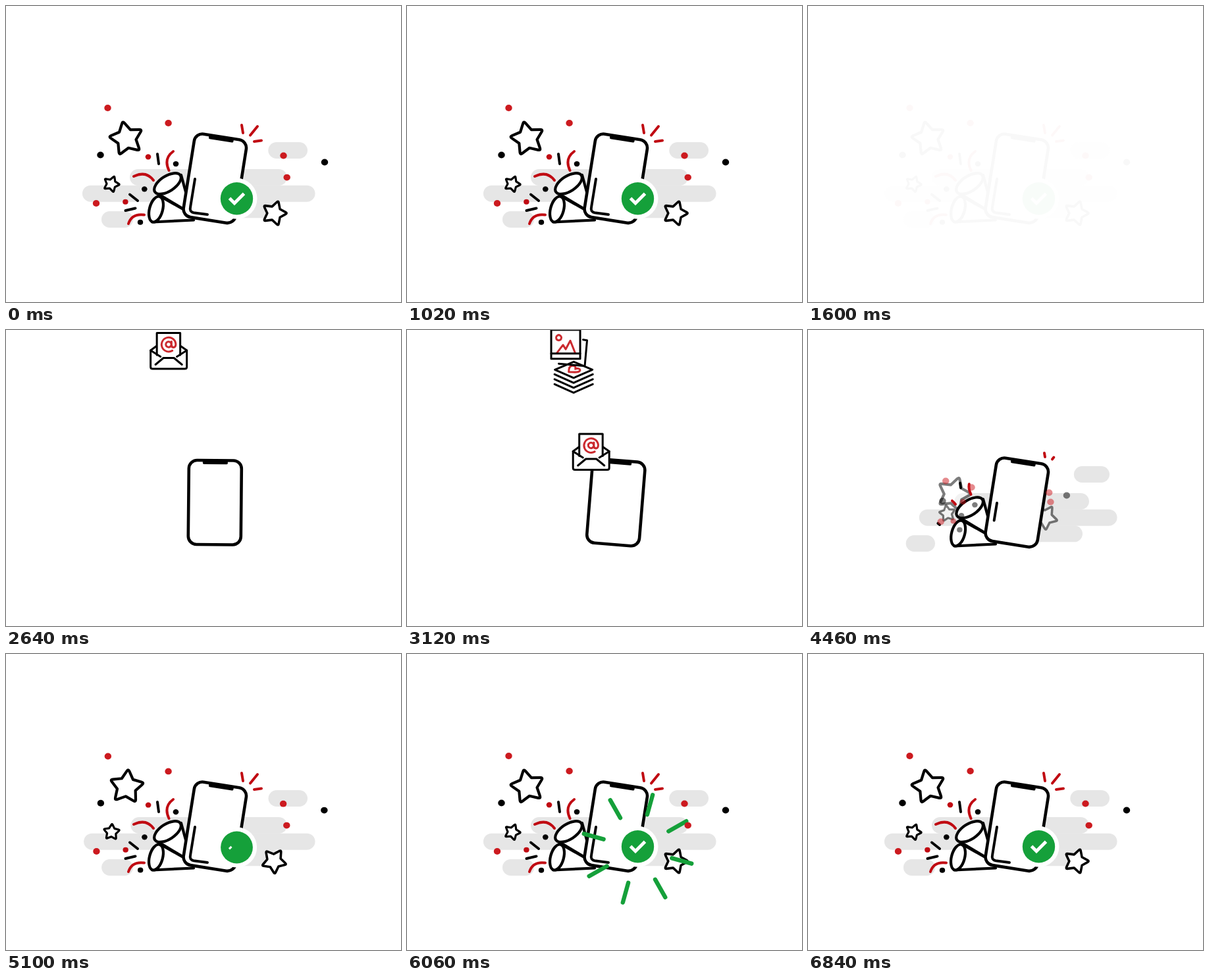
These frames come from a looping animation (600 px wide and 450 px high, 6.86 s). An HTML page:

```html
<!DOCTYPE html>
<html lang="en">
<head>
<meta charset="utf-8">
<title>Phone transfer</title>
<style>
  html, body { margin: 0; width: 100%; height: 100%; overflow: hidden; background: #fff; }
  svg { display: block; width: 100vw; height: 100vh; }
</style>
</head>
<body>
<svg id="stage" viewBox="0 0 600 450" fill="none" stroke-linecap="round" stroke-linejoin="round">
  <g id="scene">
    <g id="clouds" stroke="#e6e6e6" stroke-width="25"></g>
    <g id="stars" stroke="#000" fill="#fff"></g>
    <g id="cones" stroke="#000" stroke-width="4.2" fill="#fff">
      <path d="M266 257L275 290L285 318L230 285Z"/>
      <ellipse cx="245.5" cy="270" rx="23" ry="11.5" transform="rotate(-33 245.5 270)"/>
      <path d="M232 288L286 318V325.5L222 328.5Z" stroke="none"/>
      <path d="M232 288L285 318M222 328.5L285 325.5" fill="none"/>
      <ellipse cx="228" cy="309" rx="10" ry="20" transform="rotate(15 228 309)"/>
    </g>
    <g id="strokes" stroke-width="4"></g>
    <g id="phone" stroke="#000">
      <rect x="-40" y="-64" width="80" height="128" rx="12.5" fill="#fff" stroke-width="4.6"/>
      <rect x="-19" y="-65" width="38" height="7" rx="2" fill="#000" stroke="none"/>
    </g>
    <path id="shine" d="M287 263L280 306Q278.500 313 285 314.300L306 317" stroke="#000" stroke-width="4" pathLength="1"/>
    <g id="rays" stroke="#15a03a" stroke-width="6.4"></g>
    <g id="dots"></g>
    <g id="badge">
      <circle r="31" fill="#fff"/>
      <circle r="24.700" fill="#15a03a"/>
      <path id="check" d="M-11 -.500L-3.500 7L11 -7.500" stroke="#fff" stroke-width="5" stroke-linecap="butt" stroke-linejoin="miter" pathLength="1"/>
    </g>
  </g>
  <g id="icons" stroke="#000" stroke-width="3" fill="#fff">
    <g>
      <path d="M-27.500 -1L0 -20L27.500 -1V24Q27.500 27 24.500 27H-24.500Q-27.500 27 -27.500 24Z" stroke="none"/>
      <path d="M-18 -8L-27.500 -1V24Q-27.500 27 -24.500 27H24.500Q27.500 27 27.500 24V-1L17.500 -8" fill="none"/>
      <path d="M-18 6V-27.500H17.500V6" />
      <path d="M-27.500 -1L-12.500 8.500M27.500 -1L12.500 8.500M-20 20.500L-8 10.500H8L20 20.500" fill="none"/>
      <path d="M4 -10A4.200 4.200 0 1 1 4 -10.100M4.200 -14.500V-9Q4.500 -5.500 7.500 -5.500Q11 -6 10.700 -11A10.800 10.800 0 1 0 5.500 -.600" fill="none" stroke="#cb2a2f"/>
    </g>
    <g>
      <path d="M-28.500 -11L0 -23L28.500 -11L0 1.500Z"/>
      <path d="M-29 -4L0 9L29 -4M-29 3.500L0 16.500L29 3.500M-29 11L0 24L29 11" fill="none"/>
      <path d="M-7.500 -7.500C-7.500 -13 -5.500 -17 -1.500 -17C2.500 -17 3.500 -14 2.500 -12C6.500 -14 10.500 -12 9.500 -9.500C8.500 -6.500 1 -7 -7.500 -7.500Z" stroke="#cb2a2f"/>
    </g>
    <g>
      <path d="M21 -12.500L27 -11.500L23.500 27.500L-16 24" fill="none"/>
      <path d="M-27.500 -27.500H16.500V16.500H-27.500Z"/>
      <path d="M-19 8L-9.500 -4.500L-5.500 2L1.500 -11L9 8M-12 -15.500A4 4 0 1 1 -12 -15.600" fill="none" stroke="#cb2a2f"/>
      <path d="M-27.500 8.500H16.500"/>
    </g>
    <g>
      <path d="M-21 -23V24Q-21 29 -16 29H21.500V-18H-16Q-21 -18 -21 -23Q-21 -28 -16 -28H19V-18M-16 -23H14V-18"/>
      <circle cy="-2" r="6.300" stroke="#cb2a2f"/>
      <path d="M-11.500 17Q-11 5.500 0 5.500Q11 5.500 11.500 17Z" stroke="#cb2a2f"/>
    </g>
  </g>
</svg>
<script>
const LOOP = 6860, BUILD = 2440;
const RED = '#cc1a1f', DEEP_RED = '#c00a12', BLACK = '#000';
const $ = id => document.getElementById(id);
const clamp = v => Math.min(1, Math.max(0, v));
const span = (t, start, length) => clamp((t - start) / length);
const easeOut = u => 1 - (1 - u) ** 3;
const smooth = u => u * u * (3 - 2 * u);

function add(parent, tag, attrs) {
  const el = document.createElementNS('http://www.w3.org/2000/svg', tag);
  for (const key in attrs) el.setAttribute(key, attrs[key]);
  parent.appendChild(el);
  return el;
}
const place = (el, x, y, more = '') => el.setAttribute('transform', `translate(${x} ${y}) ${more}`);
const fade = (el, value) => el.setAttribute('opacity', value);

function trim(el, u) {
  fade(el, u > 0 ? 1 : 0);
  el.setAttribute('stroke-dasharray', u < 1 ? `${u} 2` : 'none');
}

// Smooth curve through [time, value] points.
function track(t, pts) {
  const last = pts.length - 1;
  if (t <= pts[0][0]) return pts[0][1];
  if (t >= pts[last][0]) return pts[last][1];
  const i = pts.findIndex(p => p[0] > t) - 1;
  const slope = k => {
    const a = pts[Math.max(0, k - 1)], b = pts[Math.min(last, k + 1)];
    return (b[1] - a[1]) / (b[0] - a[0]);
  };
  const [t0, a] = pts[i], [t1, b] = pts[i + 1];
  const d = t1 - t0, u = (t - t0) / d, s = smooth(u);
  return a + (b - a) * s + d * u * (1 - u) * ((1 - u) * slope(i) - u * slope(i + 1));
}

// Clouds grow from their right end: left, right, y.
const clouds = [
  [410.8, 445.5, 219.5], [200.5, 414.5, 260.5], [128.5, 457, 285.2],
  [262, 404.5, 309.8], [157.5, 180.5, 324.5]
].map(([left, right, y]) => ({ left, right, el: add($('clouds'), 'line', { x2: right, y1: y, y2: y }) }));

function starPath(radius) {
  const point = (k, r) => {
    const a = k * Math.PI / 5;
    return [r * Math.cos(a), r * Math.sin(a)];
  };
  const mix = (p, q, u) => p.map((v, i) => v + (q[i] - v) * u);
  let d = '';
  for (let k = 0; k < 10; k += 2) {
    const tip = point(k, radius * 1.08), before = point(k - 1, radius * .58), after = point(k + 1, radius * .58);
    d += `${k ? 'L' : 'M'}${before}L${mix(tip, before, .22)}Q${tip} ${mix(tip, after, .22)}`;
  }
  return d + 'Z';
}

// x, y, radius, line width, resting angle, starting turn
const stars = [
  [183, 201.5, 25.2, 4.2, -102, 140], [160, 270.7, 12, 3.2, -69, -140], [407.5, 315, 18.4, 3.6, 0, 120]
].map(([x, y, r, width, angle, turn]) => ({
  x, y, angle, turn, el: add($('stars'), 'path', { d: starPath(r), 'stroke-width': width })
}));

const strokes = [
  [BLACK, 'M232 240L230 225'], [BLACK, 'M200 296L188 286.5'], [BLACK, 'M196.500 307.500L181.500 311'],
  [DEEP_RED, 'M247.500 250Q239 232 254 221'], [DEEP_RED, 'M224 265Q213 250 194 259'],
  [DEEP_RED, 'M210 317.500Q191 315 186 331'],
  [DEEP_RED, 'M360 193L358 181'], [DEEP_RED, 'M371 196.500L382 183'], [DEEP_RED, 'M377 206L388 204.500']
].map(([stroke, d]) => add($('strokes'), 'path', { stroke, d, pathLength: 1 }));

const dots = [
  [RED, 154.5, 155, 5.2], [RED, 246.6, 178, 5.2], [RED, 137, 300, 5.2], [RED, 421.5, 227.5, 5.2],
  [RED, 426.7, 260.6, 5.2], [BLACK, 143.5, 226.5, 5.2], [BLACK, 484, 237.5, 5.2],
  [DEEP_RED, 216, 229.3, 4.3], [BLACK, 258, 240, 4.3], [BLACK, 210.3, 278.3, 4.3],
  [DEEP_RED, 181.4, 297.8, 4.2], [BLACK, 204, 328.7, 4.2]
].map(([fill, x, y, r]) => ({
  x, y, el: add($('dots'), 'ellipse', { fill, rx: r, ry: r * .95 })
}));

const rays = Array.from({ length: 8 }, (_, i) =>
  add($('rays'), 'line', { transform: `translate(350.500 296) rotate(${15.5 + i * 45})` }));
const rayReach = [[5110, 25], [5220, 94], [5330, 100], [5940, 93], [6060, 85], [6350, 25]];

const icons = [...$('icons').children];
const fall = [[-756, -38], [-504, 27], [-252, 71], [-96, 137], [0, 185], [156, 262], [300, 285]];

function fly(item, u, extra) {
  const fromX = item.x < 300 ? 250 : 325, fromY = item.x < 300 ? 285 : 262;
  place(item.el, fromX + (item.x - fromX) * u, fromY + (item.y - fromY) * u, extra);
  fade(item.el, clamp((u - .3) * 4));
}

function drawIcons(t) {
  icons.forEach((icon, i) => {
    const local = t - 3120 - i * 252;
    const y = track(local, fall), u = (y - 27) / 235;
    place(icon, 246.5 + 30 * u + 28.5 * u * u, y);
    fade(icon, t < BUILD || local < -756 ? 0 : 1 - span(local, 100, 155));
  });
}

function drawScene(t) {
  place($('phone'), 317.3, 262.2, `rotate(${9 * smooth(span(t, BUILD, 1340))})`);
  fade($('phone'), span(t, BUILD, 160));

  const grow = easeOut(span(t, 3640, 1800));
  fade($('clouds'), span(t, 3700, 270));
  for (const c of clouds) c.el.setAttribute('x1', c.right + (c.left - c.right) * grow);

  const open = easeOut(span(t, 4050, 480));
  place($('cones'), 288, 320, `scale(${open}) translate(-288 -320)`);
  fade($('cones'), open > 0 ? 1 : 0);

  strokes.forEach((el, i) => trim(el, easeOut(span(t, 4380 + (i % 3) * 50, 400))));
  trim($('shine'), smooth(span(t, 4300, 400)));

  const spin = 1 - easeOut(span(t, 4300, 1600));
  const burst = easeOut(span(t, 4300, 950));
  for (const s of stars) fly(s, burst, `rotate(${s.angle + s.turn * spin})`);
  for (const d of dots) fly(d, burst, '');

  const reach = track(t, rayReach);
  fade($('rays'), t > 5110 && t < 6350 ? 1 : 0);
  for (const ray of rays) {
    ray.setAttribute('x1', Math.max(0, reach - 31));
    ray.setAttribute('x2', reach);
  }

  place($('badge'), 350.5, 294 - span(t, 5100, 200) * 1.2, `scale(${easeOut(span(t, 4700, 520))})`);
  trim($('check'), smooth(span(t, 5050, 260)));
}

const start = performance.now();
function tick() {
  const t = Math.max(0, performance.now() - start) % LOOP;
  drawIcons(t);
  drawScene(t < BUILD ? LOOP : t);
  fade($('scene'), t < BUILD ? 1 - .975 * span(t, 1400, 200) : 1);
  requestAnimationFrame(tick);
}
tick();
</script>
</body>
</html>
```
